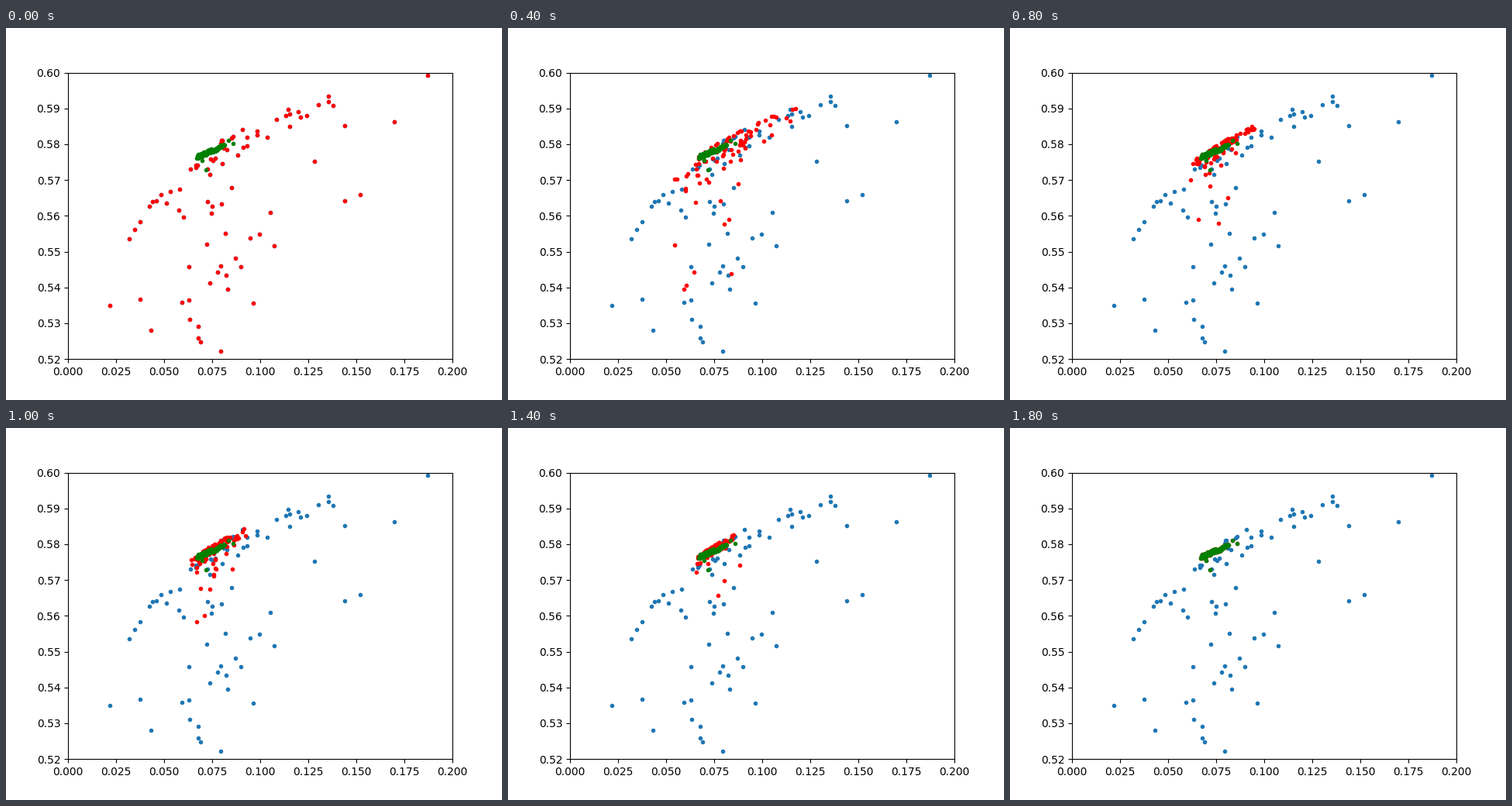
Write a matplotlib script that moves like this. It is 640x480 px and loops after 2 s.

```python
import numpy as np
import matplotlib.pyplot as plt
from matplotlib.animation import FuncAnimation

rng = np.random.default_rng(12)
STEPS = 10
SIZE = 86

# Stage pixels, y pointing down.
START_OUTLIERS = [(134, 358), (159, 272), (173, 350), (187, 390), (237, 376),
                  (277, 417), (319, 355), (346, 281), (398, 172), (457, 215),
                  (501, 121), (544, 61)]
FINAL_OUTLIERS = [(258, 183), (287, 145), (293, 149), (253, 171)]


def front(x):
    """Upper envelope that the population converges to."""
    return 631 - 95 * np.log(x - 110)


def generation(i, outliers=()):
    """A crowd along the front plus stragglers below, both shrinking with i."""
    shrink = 0.62 ** i
    lo, hi = 246 - 90 * shrink, 292 + 240 * shrink
    n_low = round(34 * 0.76 ** i)
    n_crowd = SIZE - n_low - len(outliers)

    crowd_x = lo + (hi - lo) * rng.beta(1.7, 2.6, n_crowd)
    crowd_drop = rng.exponential(4 + 14 * shrink, n_crowd)
    low_x = np.clip(rng.normal(260, 10 + 32 * shrink, n_low), lo, hi)
    low_drop = 12 + 240 * 0.85 ** i * rng.random(n_low) ** 2

    x = np.concatenate([crowd_x, low_x])
    y = front(x) + np.concatenate([crowd_drop, low_drop])
    return np.vstack([np.column_stack([x, y]), *outliers])


def final_generation():
    """A thin slanted cluster, densest at its left end."""
    n = SIZE - len(FINAL_OUTLIERS)
    x = 246 + 38 * rng.beta(1.1, 1.5, n)
    y = 166 - 0.42 * (x - 246) + rng.uniform(-2, 3, n)
    return np.vstack([np.column_stack([x, y]), *FINAL_OUTLIERS])


def to_data(points):
    px, py = points.T
    return (px - 80) / 496 * 0.2, 0.6 - (py - 57.6) / 369.6 * 0.08


start = generation(0, START_OUTLIERS)
middle = [generation(i) for i in range(1, STEPS - 1)]
final = final_generation()
generations = [start, *middle, final]

fig, ax = plt.subplots(figsize=(6.4, 4.8), dpi=100)
ax.set_xlim(0, 0.2)
ax.set_ylim(0.52, 0.6)
ax.plot(*to_data(start), ".", color="tab:blue")
current, = ax.plot([], [], ".", color="red")
ax.plot(*to_data(final), ".", color="green")


def update(i):
    current.set_data(*to_data(generations[i]))
    return current,


anim = FuncAnimation(fig, update, frames=STEPS, interval=200,
                     repeat=True, repeat_delay=0)
plt.show()
```
